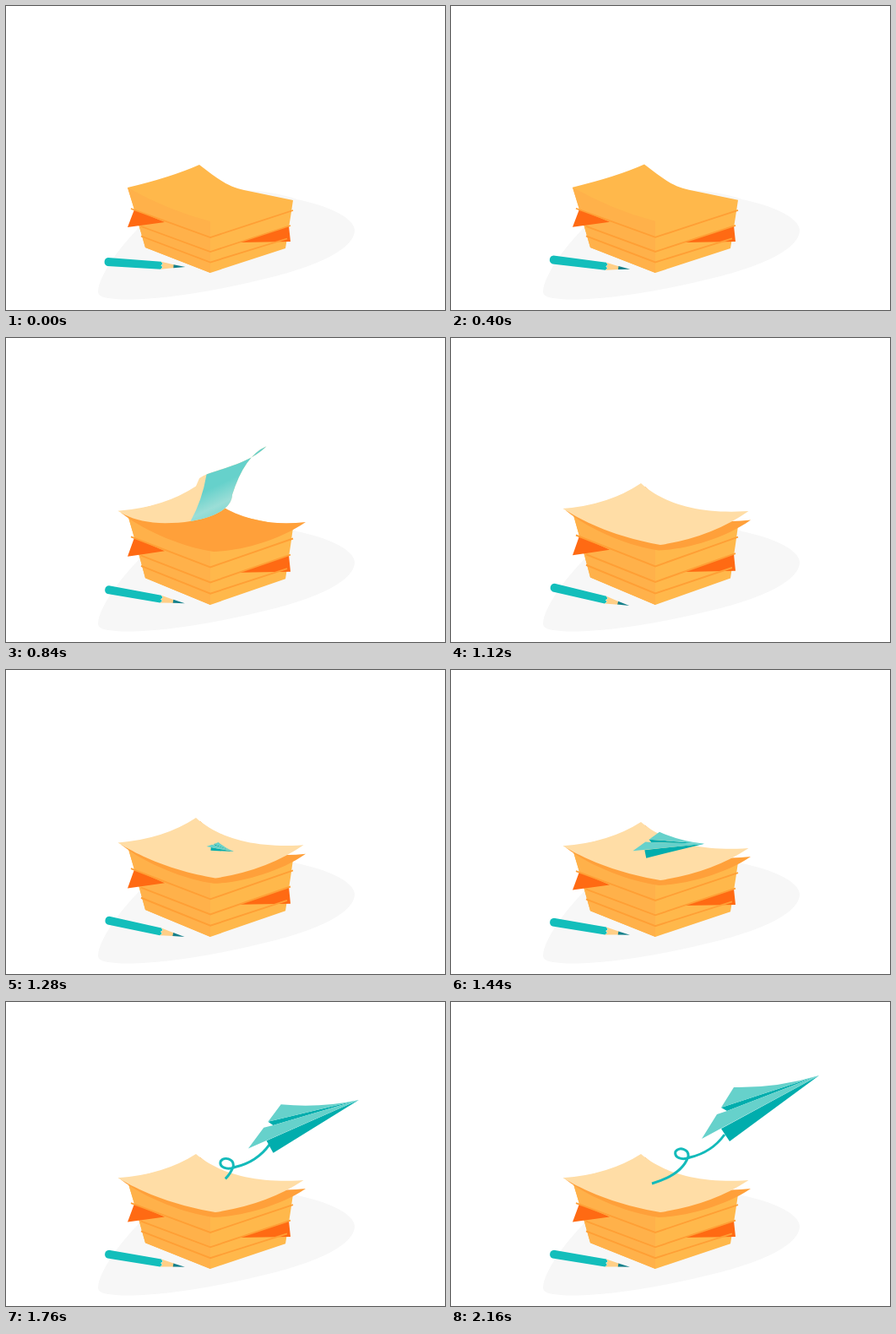
An HTML page for the animation above (3040 ms loop, 520 by 360 pixels).

```html
<!DOCTYPE html>
<html lang="en">
<head>
<meta charset="utf-8">
<title>Paper stack</title>
<style>
html, body { margin: 0; width: 100%; height: 100%; overflow: hidden; background: #fff; }
svg { display: block; width: 520px; height: 360px; }
</style>
</head>
<body>
<svg viewBox="0 0 520 360">
  <defs>
    <linearGradient id="sheen" x1=".4" y1="1" x2=".18" y2=".55">
      <stop offset="0" stop-color="#76d5cf"/>
      <stop offset=".42" stop-color="#9bded7"/>
      <stop offset=".9" stop-color="#66d1cb"/>
    </linearGradient>
    <clipPath id="wipe"><rect id="wipeBox" x="100" y="170" width="300" height="0"/></clipPath>
  </defs>

  <path fill="#f7f7f7" d="M109 338C110 316 145 270 180 242C230 212 300 213 345 229C392 239 413 254 413 266C412 290 360 312 290 327C230 341 165 350 130 347C116 346 109 344 109 338Z"/>

  <g id="stack">
    <path fill="#ffb84b" d="M144 215Q195 203 229 188C250 204 262 214 282 218L340 230L337 250L331 287L242 316L165 286L152 241Z"/>
    <path fill="#ffb14a" d="M144 215Q192 242 242 255V316L165 286L152 241Z"/>
    <path fill="#ff6a13" d="M152 241L188 256L144 262ZM275 280L335 260.500L337 279Z"/>
    <path fill="none" stroke="#ff9f35" stroke-width="1.800" d="M148 240L242 274L340 242M160 261L242 291L337 260M160 272.500L242 303.500L333 275.500"/>
    <path fill="#ffa03a" clip-path="url(#wipe)" d="M136 213Q193 203 230 187C262 217 305 229 355 223.500C322 245 275 256 246 256.500C215 253 165 235 136 213Z"/>
    <path id="paper" fill="#ffdda6"/>
    <path id="flap" fill="url(#sheen)"/>
  </g>

  <g id="pencil">
    <path fill="#13bebb" d="M-45-5L18-4.500L20-2L18 0L20 2L18 4.500L-45 5Q-49 4-49 0T-45-5Z"/>
    <path fill="#ffcf87" d="M18-4.500L34-1.800V1.800L18 4.500L20.500 2L18.500 0L20.500-2Z"/>
    <path fill="#15808b" d="M33-2L47 0L33 2Z"/>
  </g>

  <path id="trail" fill="none" stroke="#13baba" stroke-width="3" pathLength="1" d="M238 215C262 208 276 198 281 183C282 174 270 171 266 177C264 184 273 188 283 184C300 180 314 171 324 157"/>
  <g id="plane">
    <path fill="#00adad" d="M0 0L-116 38L-109 42ZM0 0L-116 63L-106 78Z"/>
    <path fill="#66d1cb" d="M0 0Q-50 15-101 14L-116 38ZM0 0L-109 42L-121 46L-139 75Z"/>
  </g>
</svg>
<script>
const LOOP = 3040, STEP = 40, FLOOR = 316;
const $ = id => document.getElementById(id);
const clamp = v => Math.min(1, Math.max(0, v));
const ramp = (t, from, to) => clamp((t - from) / (to - from));
const mix = (a, b, p) => a.map((v, i) => v + (b[i] - v) * p);
const bend = (a, c, b, u) => mix(mix(a, c, u), mix(c, b, u), u);
const set = (id, attrs) => { for (const k in attrs) $(id).setAttribute(k, attrs[k]); };
const show = (id, on) => set(id, { visibility: on ? "visible" : "hidden" });

// Long edges of the sheet, left to right, in the air and at rest.
// The front touches down well ahead of the back.
const back = {
  lag: .5,
  air: [[221, 98.7], [278, 87], [330, 98.7]],
  rest: [[225, 183.4], [268, 219], [352.5, 213.7]],
};
const front = {
  lag: 2,
  air: [[129, 171.8], [177, 166], [225, 162]],
  rest: [[132.5, 211], [182, 240], [248, 250.6]],
};
const landed = (u, lag, time) => clamp(time - .65 * u ** lag);

function edgePoint({ lag, air, rest }, u, time) {
  const p = landed(u, lag, time);
  const [x, y] = mix(bend(...air, u), bend(...rest, u), p);
  const turn = 1 - 2.7 * u * p * (1 - p);
  return [290 + (x - 290) * turn, y];
}

function edge(side, from, to, time) {
  return Array.from({ length: 25 }, (_, i) => edgePoint(side, from + (to - from) * i / 24, time));
}

// Bend of a short edge between its two ends.
function belly(a, b, u, time) {
  const p = landed(u, front.lag, time);
  const [dx, dy] = mix([-5 - 8 * u, -7 - 24 * u], [8, 10], p);
  return [(a[0] + b[0]) / 2 + dx, (a[1] + b[1]) / 2 + dy];
}

// Outline of the sheet to the right of the crease.
function outline(crease, time) {
  const start = crease ** (1 / front.lag);
  const top = edge(back, crease ** (1 / back.lag), 1, time);
  const low = edge(front, 1, start, time);
  const right = belly(top[24], low[0], 1, time);
  const left = belly(top[0], low[24], start, time);
  return `M${top.join("L")}Q${right} ${low.join("L")}Q${left} ${top[0]}Z`;
}

function drawStack(t) {
  const rise = ramp(t, 0, 680), press = ramp(t, 680, 1140), relax = 1 - ramp(t, 1180, 1440);
  const k = 1 + .026 * rise ** 4 + .06 * (1 - (1 - press) ** 2) * relax;
  const tilt = 3.7 + 5.8 * rise + 4.3 * press ** 2 * relax;
  set("stack", { transform: `translate(0 ${FLOOR * (1 - k)}) scale(1 ${k})` });
  set("pencil", { transform: `translate(165.5 306) rotate(${tilt})` });
  set("wipeBox", { height: 95 * ramp(t, 600, 820) });
}

function drawSheet(t) {
  const time = Math.max(0, (t - 680) / 160);
  const crease = ramp(time, .6, 1.8);
  show("paper", crease > 0);
  show("flap", t >= 640 && crease < 1);
  set("paper", { d: outline(0, time) });
  set("flap", { d: outline(crease, time) });
}

function drawPlane(t) {
  const left = (1 - ramp(t, 1200, 2160)) ** 2.7;
  // Grows on the paper first, then takes off.
  const x = Math.max(270, 436 - 364 * left ** 1.27);
  const y = Math.min(215, 87 + 237 * left ** .89);
  show("plane", left < 1);
  set("plane", { transform: `translate(${x} ${y}) rotate(${49 * left}) scale(${1 - left})` });

  const hidden = clamp(2.7 * left);
  show("trail", hidden < 1);
  set("trail", {
    transform: `translate(${.65 * (x - 436)} ${.4 * (y - 87)})`,
    "stroke-dasharray": `0 ${hidden} 2 0`,
  });
}

function draw(t) {
  drawStack(t);
  drawSheet(t);
  drawPlane(t);
}

const begin = performance.now();
function tick() {
  const t = (performance.now() - begin) % LOOP;
  draw(Math.floor(t / STEP) * STEP);
  requestAnimationFrame(tick);
}
tick();
</script>
</body>
</html>
```
